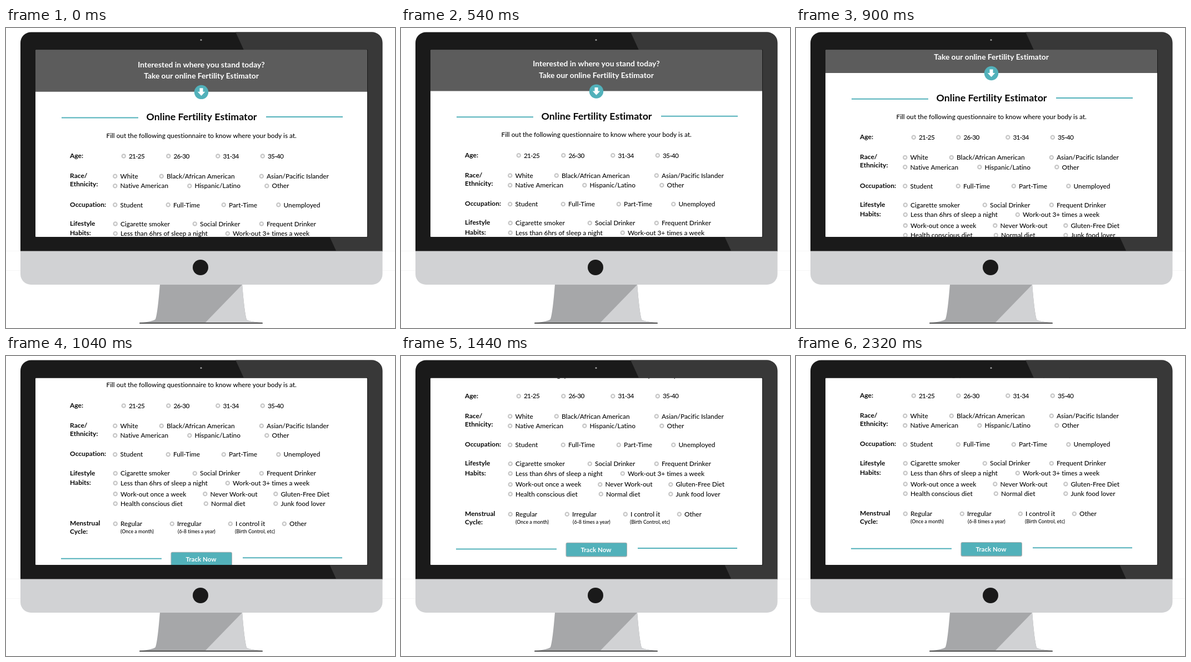
Recreate the animation shown at these times as an HTML page with a canvas. Size 700 by 540 pixels, loop 3280 ms.

```html
<!DOCTYPE html>
<html lang="en">
<head>
<meta charset="utf-8">
<title>Online estimator on a desktop screen</title>
<style>
  html, body { margin: 0; width: 100%; height: 100%; overflow: hidden; background: #fff; }
  canvas { display: block; }
</style>
</head>
<body>
<canvas id="stage" width="700" height="540"></canvas>
<script>
const ctx = document.getElementById('stage').getContext('2d');
const LOOP = 3280, TRAVEL = 160;
const INK = '#080808', BLACK = '#1a1a1a', TEAL = '#52b1ba', SILVER = '#d1d2d4';
const PITCH = 17.4, HEAD_PITCH = 15.2, RADIO_GAP = 9.2;

// moments at which the page jumps; afterwards it glides
const jumps = [0, 400, 540, 680, 780, 900, 960, 1000, 1040, 1140, 1260, 1380];

function text(str, x, y, size, { weight = 500, color = INK, align = 'left', spacing = 0.01 } = {}) {
  ctx.font = `${weight} ${size}px Lato, "Open Sans", sans-serif`;
  ctx.letterSpacing = spacing + 'px'; // any spacing also turns ligatures off
  ctx.textAlign = align;
  ctx.fillStyle = color;
  ctx.fillText(str, x, y);
}

function box(x, y, w, h, color, radius = 0) {
  ctx.fillStyle = color;
  ctx.beginPath();
  ctx.roundRect(x, y, w, h, radius);
  ctx.fill();
}

function disc(x, y, r, color) {
  ctx.fillStyle = color;
  ctx.beginPath();
  ctx.arc(x, y, r, 0, Math.PI * 2);
  ctx.fill();
}

function poly(color, ...pts) {
  ctx.fillStyle = color;
  ctx.beginPath();
  pts.forEach(([x, y]) => ctx.lineTo(x, y));
  ctx.closePath();
  ctx.fill();
}

function radio(x, y) {
  ctx.strokeStyle = '#c8c8c8';
  ctx.lineWidth = 2.3;
  ctx.beginPath();
  ctx.arc(x, y, 3.1, 0, Math.PI * 2);
  ctx.stroke();
}

// a block of the form: heading lines on the left, rows of {label: x} on the right
function group(y, heading, rows, style = {}) {
  heading.forEach((s, i) => text(s, 115, y + 3.3 + i * HEAD_PITCH, 12, { weight: 700 }));
  rows.forEach((row, i) => {
    const mid = y + i * PITCH;
    for (const [label, x] of Object.entries(row)) {
      radio(x - RADIO_GAP, mid);
      text(label, x, mid + 4.2, 11.8, style);
    }
  });
}

function drawStand() {
  ctx.save();
  ctx.fillStyle = '#a6a7a9';
  ctx.beginPath();
  ctx.moveTo(277, 461);
  ctx.lineTo(425, 461);
  ctx.quadraticCurveTo(429, 512, 433, 525);
  ctx.quadraticCurveTo(436, 528, 461, 530.6);
  ctx.lineTo(241, 530.6);
  ctx.quadraticCurveTo(266, 528, 269, 524);
  ctx.quadraticCurveTo(273, 512, 277, 461);
  ctx.fill();
  ctx.clip();
  poly(SILVER, [425, 462], [358, 531], [462, 531], [440, 462]);
  ctx.restore();
  box(240, 530.4, 222, 1.6, BLACK, 0.8);
}

function drawMonitor() {
  box(0, 401, 700, 1, '#f6f6f6');
  box(0, 436, 700, 1, '#f6f6f6');
  drawStand();

  // bezel with diagonal sheen
  ctx.save();
  ctx.beginPath();
  ctx.roundRect(26, 7.5, 651.5, 395, [19, 19, 0, 0]);
  ctx.clip();
  box(26, 7, 652, 396, BLACK);
  poly('#383838', [413, 7], [676.8, 7], [676.8, 401], [594, 401]);
  ctx.restore();

  box(26, 401.5, 651.5, 60.5, SILVER, [0, 0, 19, 19]);
  disc(351, 21.5, 1.6, '#9a9a9a');
  disc(350, 431, 14, BLACK);
  box(53, 39, 598, 337.5, BLACK);
}

function drawBanner() {
  const style = { weight: 700, color: '#fff', align: 'center' };
  box(53, 0, 597.5, 115.2, '#5c5c5c');
  text('Interested in where you stand today?', 351.5, 70.9, 13.85, style);
  text('Take our online Fertility Estimator', 351.5, 91.4, 13.75, style);
  disc(351.5, 115.8, 12.7, TEAL);
  poly('#fff', [348.5, 108.7], [354.5, 108.7], [354.5, 115.2], [358.3, 115.2],
    [351.5, 122.5], [344.7, 115.2], [348.5, 115.2]);
}

function drawForm() {
  box(100, 161, 138, 2, TEAL);
  box(468, 159.4, 138, 2, TEAL);
  text('Online Fertility Estimator', 352, 166.2, 17.75, { weight: 700, align: 'center' });
  text('Fill out the following questionnaire to know where your body is at.',
    351.7, 198, 11.72, { align: 'center' });

  group(231, ['Age:'],
    [{ '21-25': 221, '26-30': 301.5, '31-34': 390.5, '35-40': 471 }], { spacing: -0.75 });
  group(267.2, ['Race/', 'Ethnicity:'], [
    { 'White': 205.5, 'Black/African American': 289, 'Asian/Pacific Islander': 469 },
    { 'Native American': 205.5, 'Hispanic/Latino': 339.5, 'Other': 478.5 }
  ]);
  group(318.7, ['Occupation:'],
    [{ 'Student': 205.5, 'Full-Time': 301, 'Part-Time': 401, 'Unemployed': 499.5 }]);
  group(352.8, ['Lifestyle'],
    [{ 'Cigarette smoker': 206, 'Social Drinker': 349, 'Frequent Drinker': 469 }]);
  group(370.3, ['Habits:'],
    [{ 'Less than 6hrs of sleep a night': 206, 'Work-out 3+ times a week': 408 }]);
  group(389.9, [], [
    { 'Work-out once a week': 206, 'Never Work-out': 367.5, 'Gluten-Free Diet': 494.5 },
    { 'Health conscious diet': 206, 'Normal diet': 369, 'Junk food lover': 494.5 }
  ]);
  group(443.5, ['Menstrual', 'Cycle:'],
    [{ 'Regular': 206, 'Irregular': 308, 'I control it': 413, 'Other': 510 }]);
  ['(Once a month)', '(6-8 times a year)', '(Birth Control, etc)']
    .forEach((s, i) => text(s, 206 + i * 103, 460.6, 8.9));

  box(99, 505.3, 181, 2, TEAL);
  box(426, 503.7, 179, 2, TEAL);
  box(296.5, 494.4, 110.5, 26, '#a9adae', 3);
  box(297.5, 495.4, 108.5, 23.7, TEAL, 2);
  text('Track Now', 351, 511.5, 11.5, { weight: 700, color: '#fff', align: 'center' });
}

// steep in the middle with long, slow tails on both sides
function scrollAt(t) {
  const last = jumps.at(-1);
  const held = t > last ? Math.min(t, 1780) : jumps.findLast(j => j <= t);
  const u = held - 950, k = 1.8;
  return TRAVEL * (0.5 + 0.5 * u / (Math.abs(u) ** k + 68 ** k) ** (1 / k));
}

function render(t) {
  ctx.fillStyle = '#fff';
  ctx.fillRect(0, 0, 700, 540);
  drawMonitor();
  ctx.save();
  ctx.beginPath();
  ctx.roundRect(53, 39.7, 597, 336.3, 1);
  ctx.clip();
  box(53, 39, 598, 338, '#fff');
  ctx.translate(0, -scrollAt(t));
  drawBanner();
  drawForm();
  ctx.restore();
}

const start = performance.now();
function tick(now) {
  render(Math.max(0, now - start) % LOOP);
  requestAnimationFrame(tick);
}
tick(start);
</script>
</body>
</html>
```
